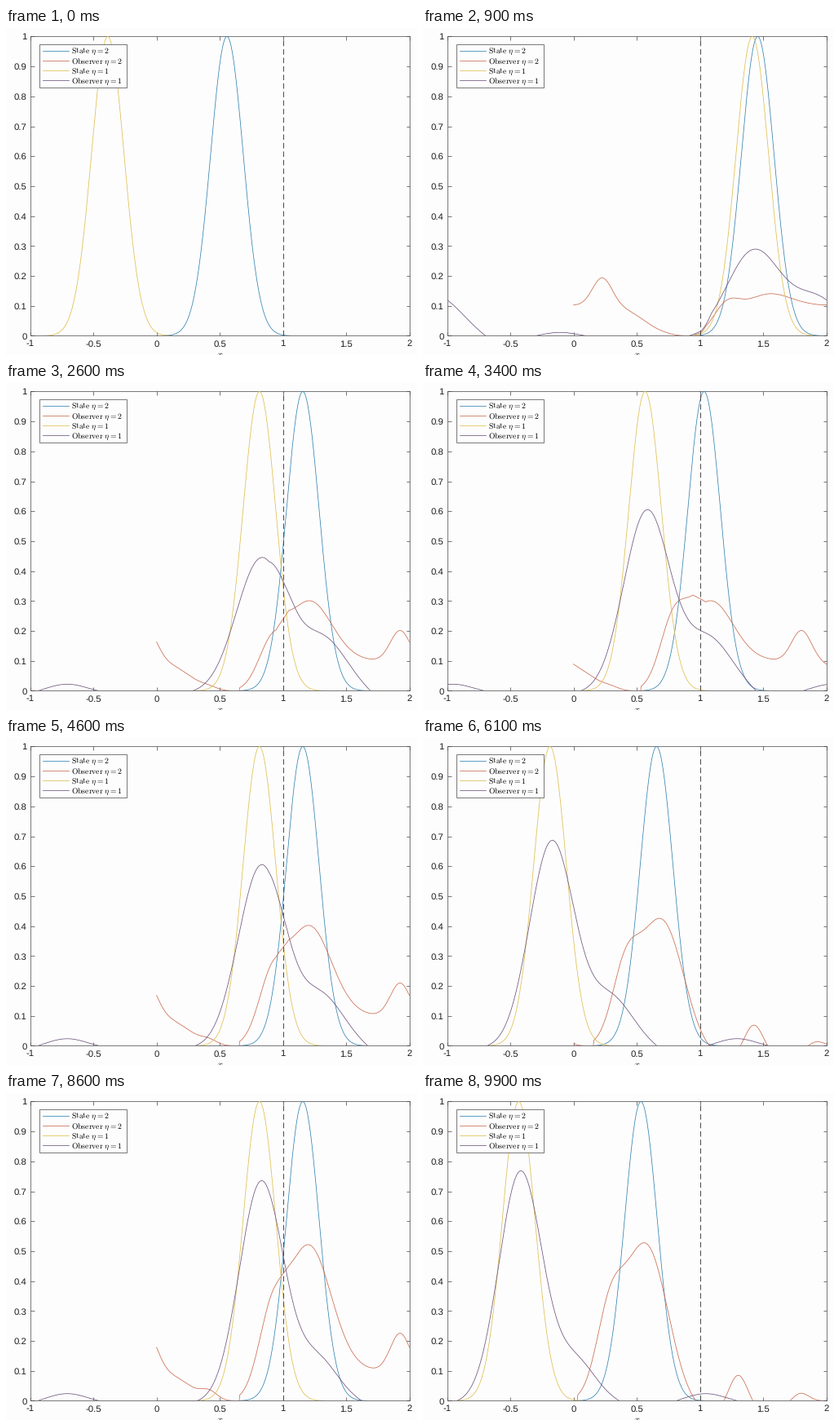
A matplotlib script for the animation above (10000 ms loop, 504 px wide and 401 px high).

```python
import numpy as np
import matplotlib.pyplot as plt
from matplotlib.animation import FuncAnimation
from matplotlib.patches import Rectangle

W, H = 504, 401
FRAMES, STEP = 100, 100
START, LAG = .062, .01
BLUE, RED, GOLD, PURPLE = "#2f80ad", "#c9684a", "#dfbd4a", "#6a5078"
PAPER, INK, EDGE = "#fdfdfe", "#1c1c1c", "#444444"

plt.rcParams.update({"font.family": "Liberation Sans",
                     "mathtext.fontset": "cm", "text.hinting": "none"})


def bell(x, mid, width):
    return np.exp(-((x - mid) / width) ** 2)


def state(d):
    return np.exp(-30 * d ** 2)


def travel(s):
    """Triangle wave between 0 and 2 with a period of 2 s."""
    s = s % 2
    return 2 * min(s, 2 - s)


def observer1(d, n):
    """Estimate for eta = 1 after n sensor passes: peak, slow tail, far ripple."""
    peak = .945 * n / (n + 2.2)
    grown = 1 - np.exp(-n)
    tail = (.21 - .007 * n) * bell(d, .53 - .008 * n, .28 - .005 * n)
    ripple = .034 * bell(d, 1.48, .23) - .03 * bell(d, 1, .15)
    main = peak * np.exp(-(7 + 13 * peak) * (d - .015) ** 2)
    return main + grown * (tail + ripple) - .01


def observer2(d, n):
    """Estimate for eta = 2: two peaks, far humps, and a bias flipping each pass."""
    main = .82 * n / (n + 5.6) * bell(d, .04, .25)
    shoulder = .3 * n / (n + 2.5) * bell(d, -.25, .15)
    humps = (.09 + .004 * n) * bell(d, .77, .11) + .003 * n * bell(d, 1.26, .09)
    bias = (.1 if n % 2 else -.045) * np.exp(-((d - .65) / .5) ** 4)
    return main + shoulder + min(n, 1) * (humps + bias)


def estimate(profile, d, meet, s, soft=.2):
    """Each point is updated once the sensor has swept over it."""
    k = int(s)
    sign = -1 if k % 2 else 1
    meet = np.clip(meet, .55, 2 - soft / 2)
    done = np.clip(sign * (travel(s) - meet) / soft + .5, 0, 1)
    return profile(d, k) * (1 - done) + profile(d, k + 1) * done


fig = plt.figure(figsize=((W + .01) / 72, (H + .01) / 72), dpi=72,
                 facecolor=PAPER)
ax = fig.add_axes([29.6 / W, 1 - 377.5 / H, 465 / W, 367 / H],
                  facecolor=PAPER, xlim=(-1, 2), ylim=(0, 1))
xt, yt = np.linspace(-1, 2, 7), np.linspace(0, 1, 11)
ax.set_xticks(xt, [f"{v:g}" for v in xt])
ax.set_yticks(yt, [f"{v:.1g}" for v in yt])
ax.tick_params(direction="in", length=4.5, width=.7, color=EDGE, top=True,
               right=True, labelsize=11.4, labelcolor=INK)
ax.tick_params(axis="x", pad=5)
ax.tick_params(axis="y", pad=4)
for side in ax.spines.values():
    side.set(linewidth=.7, color=EDGE)
fig.text(262.5 / W, 1 - 403.5 / H, "$x$", size=12, ha="center",
         va="baseline", color=INK)

x1, x2 = np.linspace(-1, 2, 900), np.linspace(0, 2, 600)
state2, obs2, state1, obs1 = (
    ax.plot([], [], color=c, lw=.75, zorder=2.6)[0]
    for c in (BLUE, RED, GOLD, PURPLE))
ax.plot([1, 1], [0, 1], color=EDGE, lw=.95, dashes=(7, 4), zorder=2.7)


def add_legend():
    layer = fig.add_axes([0, 0, 1, 1], xlim=(0, W), ylim=(H, 0))
    layer.axis("off")
    layer.add_patch(Rectangle((40.6, 20.3), 107.5, 52.5, fc=PAPER, ec=EDGE,
                              lw=.7))
    names = [("State", 2, BLUE), ("Observer", 2, RED),
             ("State", 1, GOLD), ("Observer", 1, PURPLE)]
    for i, (name, eta, color) in enumerate(names):
        y = 28.2 + 12.1 * i
        layer.plot([44.5, 76.5], [y, y], color=color, lw=.75)
        layer.text(79.5, y + 3.2, rf"$\mathrm{{{name}}}\ \eta = {eta}$",
                   size=9.7, va="baseline", color="black")


add_legend()


def draw(i):
    s = i * STEP / 1000 + START
    u = travel(s) - LAG
    c1, c2 = -.5 + u, .5 + u / 2
    state1.set_data(x1, state(x1 - c1))
    state2.set_data(x2, state(x2 - c2))
    # Both observers live on periodic domains.
    d1 = (x1 - c1 + .53) % 3 - .53
    d2 = (x2 - c2 + .5) % 2 - .5
    obs1.set_data(x1, estimate(observer1, d1, 1.5 - d1, s))
    obs2.set_data(x2, estimate(observer2, d2, 1 - 2 * d2, s))
    return state2, obs2, state1, obs1


anim = FuncAnimation(fig, draw, frames=FRAMES, interval=STEP, repeat=True,
                     repeat_delay=0, blit=False)
plt.show()
```
